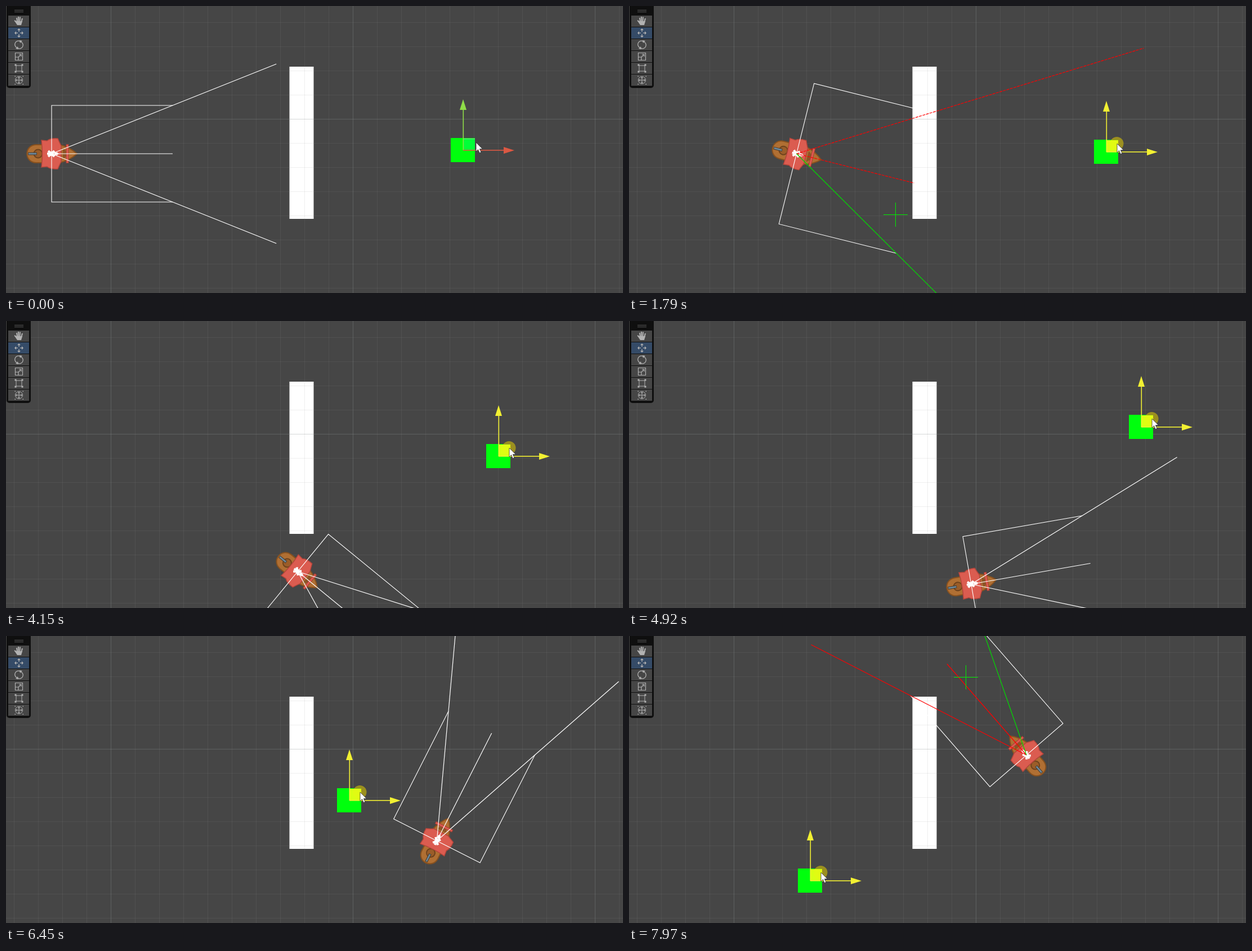
Write an HTML page with a canvas that moves like this. It is 1096 by 511 pixels and loops after 8 s.

```html
<!DOCTYPE html>
<html lang="en">
<head>
<meta charset="utf-8">
<title>Boat steering around a wall</title>
<style>
  html, body { margin: 0; width: 100%; height: 100%; overflow: hidden; background: #464646; }
  canvas { display: block; }
</style>
</head>
<body>
<canvas id="stage" width="1096" height="511"></canvas>
<script>
const ctx = document.getElementById('stage').getContext('2d');
const W = 1096, H = 511, LOOP = 8000, STEP = 69.5, UNIT = 43, SPEED = 0.123;
const RAD = Math.PI / 180;

// time, x, y, heading in degrees
const BOAT = [
  [270, 111, 263, 0], [1680, 284, 263, 0], [1784, 297.5, 263, 14], [2700, 397, 315, 36],
  [3105, 435, 348, 45.5], [3500, 466, 385, 50], [4000, 504, 433, 50], [4147, 518, 446, 39.4],
  [5270, 649, 453, -33], [5676, 694.5, 425.5, -33], [6060, 732, 398, -38],
  [6880, 782, 316, -92], [7205, 772, 274, -119.5], [7690, 730, 238, -142], [7970, 706, 212, -131]
];
// time, x, y
const TARGET = [
  [1090, 812, 256.5], [1784, 848, 260.5], [3105, 873.5, 242.5], [4147, 875, 241.5],
  [4360, 881, 214], [5190, 925, 176], [5676, 935.5, 185.5], [6080, 935.5, 185.5],
  [6430, 620, 290], [6800, 296, 393], [6950, 293, 395], [7205, 299.5, 402.5], [7690, 322, 435.5]
];
// time, distance, angle from the heading
const WAYPOINT = [[1784, 206, 17.6], [3105, 190, 5.5], [3960, 188, 4], [7640, 176, 3]];

function segment(keys, t) {
  let i = 0;
  while (i < keys.length - 2 && t >= keys[i + 1][0]) i++;
  const [a, b] = [keys[i], keys[i + 1]];
  const u = Math.min(1, Math.max(0, (t - a[0]) / (b[0] - a[0])));
  return { a, b, u };
}
function lerpKeys(keys, t) {
  const { a, b, u } = segment(keys, t);
  return a.map((v, i) => v + (b[i] - v) * u).slice(1);
}
function boatAt(t) {
  if (t < 270) return { x: 81, y: 263, h: 0 };
  const { a, b, u } = segment(BOAT, t);
  const reach = SPEED * (b[0] - a[0]);
  const curve = (p, q, m, n) => {
    const u2 = u * u, u3 = u2 * u;
    return (2 * u3 - 3 * u2 + 1) * p + (3 * u2 - 2 * u3) * q
      + (u3 - 2 * u2 + u) * m * reach + (u3 - u2) * n * reach;
  };
  return {
    x: curve(a[1], b[1], Math.cos(a[3] * RAD), Math.cos(b[3] * RAD)),
    y: curve(a[2], b[2], Math.sin(a[3] * RAD), Math.sin(b[3] * RAD)),
    h: a[3] + (b[3] - a[3]) * u
  };
}

function line(color, width, ...pts) {
  ctx.beginPath();
  for (let i = 0; i < pts.length; i += 2) ctx.lineTo(pts[i], pts[i + 1]);
  ctx.strokeStyle = color;
  ctx.lineWidth = width;
  ctx.stroke();
}
function shape(fill, stroke, width, path) {
  const p = typeof path === 'string' ? new Path2D(path) : path;
  if (fill) { ctx.fillStyle = fill; ctx.fill(p); }
  if (stroke) { ctx.strokeStyle = stroke; ctx.lineWidth = width; ctx.stroke(p); }
}
function disc(x, y, r) {
  const p = new Path2D();
  p.arc(x, y, r, 0, 7);
  return p;
}
function rect(color, x, y, w, h) {
  ctx.fillStyle = color;
  ctx.fillRect(x, y, w, h);
}

function drawGrid() {
  const minor = 'rgba(140,140,140,.14)', major = 'rgba(140,145,145,.36)';
  for (let k = -4; k <= 21; k++) rect(k % 10 ? minor : major, 186 + k * UNIT, 0, 1, H);
  for (let k = -4; k <= 7; k++) rect(k ? minor : major, 0, 201 + k * UNIT, W, 1);
}

function drawBoat({ x, y, h }) {
  ctx.save();
  ctx.translate(x, y);
  ctx.rotate(h * RAD);
  shape('#b06f33', '#87511f', 2, 'M-28-16C-49-15-49 15-28 16L14 16Q32 12 45 0Q32-12 14-16Z');
  shape('#9b5d29', '#6f431d', 2, disc(-24, 0, 7.5));
  line('#4f4438', 5, -42, 0, -26, 0);
  line('#6c8ba0', 2.5, -41, 0, -27, 0);
  shape('#8c5426', null, 0, 'M20-10L32 0L20 10Z');
  shape('#db5c50', '#b3453b', 1.5,
    'M-18-24L-8-23Q-2-28 11-27Q14-20 17-14L17 14Q14 20 11 27Q-2 28-8 23L-18 24Q-15 0-18-24Z');
  line('#a43f35', 5, 28, -17, 28, 17);
  line('#dd5b50', 3, 28, -16, 28, 16);
  line('#fff', 4, -6, -5, 5, 5);
  line('#fff', 4, -6, 5, 5, -5);
  shape('#fff', null, 0, disc(0, 0, 4));
  shape('#fff', null, 0, 'M-8-2h4v4h-4zM5-2.5h5l3 2.5-3 2.5h-5z');
  ctx.restore();
}

function drawSensors(boat, t) {
  const first = t >= 1680 && t < 3960;
  const avoiding = first || t >= 7640;
  const wide = t >= 1680 && t < 2830;
  const side = (wide ? 3 : 2) * UNIT, front = 5 * UNIT, reach = (wide ? 15 : 10) * UNIT;
  const spread = Math.atan2(side, front);
  const c = Math.cos(boat.h * RAD), s = Math.sin(boat.h * RAD);
  const at = (f, r) => [boat.x + f * c - r * s, boat.y + f * s + r * c];
  const ray = (angle, len) => [boat.x, boat.y, ...at(len * Math.cos(angle), len * Math.sin(angle))];
  const hit = avoiding ? '#f00' : '#fff', free = avoiding ? '#0d0' : '#fff';

  line('#fff', 1.1, ...at(front, -side), ...at(0, -side), ...at(0, side), ...at(front, side));
  if (wide) ctx.setLineDash([5, 1.5]);
  line(hit, 1.2, ...ray(0, front));
  line(hit, 1.2, ...ray(-spread, reach));
  ctx.setLineDash([]);
  line(free, 1.2, ...ray(spread, reach));

  if (avoiding) {
    const [len, angle] = lerpKeys(WAYPOINT, t);
    const [, , wx, wy] = ray(angle * RAD, len).map(Math.round);
    rect('#0e0', wx - 21, wy, 43, 1);
    rect('#0e0', wx, wy - 21, 1, 43);
  }
}

function drawTarget(t) {
  const [x, y] = lerpKeys(TARGET, t).map(Math.round);
  const drag = t >= 1090;
  const up = drag ? '#f2f032' : '#8fdc48', right = drag ? '#f2f032' : '#db5843';
  const [cx, cy] = t < 700 ? [x + 23, y - 14] : [x + 19, y - 15];

  rect('#00ff0d', x - 22, y - 22, 43, 43);
  if (drag) shape('rgba(174,160,24,.82)', null, 0, disc(cx - 0.5, cy, 12));
  rect(drag ? 'rgba(230,255,20,.95)' : '#00ff38', x, y - 21, 21, 21);
  if (!drag) {
    rect('#8fc0a0', x, y - 21, 21, 1);
    rect('#e09a30', x, y - 1, 21, 1);
  }
  rect(up, x - 0.5, y - 74, 1.6, 74);
  rect(right, x, y - 1, 74, 1.6);
  shape(up, null, 0, `M${x} ${y - 91}l6 19h-12z`);
  shape(right, null, 0, `M${x + 91} ${y}l-19-6v12z`);
  shape('#fff', '#333', 0.8, `M${cx} ${cy}v16l3.6-3.4 2.6 6 2.8-1.2-2.6-5.8h5z`);
}

function drawToolbar() {
  ctx.beginPath();
  ctx.roundRect(1, -6, 43, 152, 5);
  ctx.fillStyle = '#0f0f0f';
  ctx.fill();
  rect('#5c5c5c', 15, 7, 16, 1);
  rect('#5c5c5c', 15, 10, 16, 1);
  const icon = '#b2b2b2';
  const arrows = 'M0-8l3 3h-6zM0 8l3-3h-6zM-8 0l3-3v6zM8 0l-3-3v6z';
  const icons = [
    () => {
      shape(icon, null, 0, 'M-4 0L-8-2Q-9 0-7 1L-3 7H4L6 0Z');
      [[-4, -6], [-1, -8], [2, -7.5], [6, -5]].forEach(([x, y]) => line(icon, 2, x, y, x * 0.7, 2));
    },
    () => {
      shape(icon, null, 0, arrows);
      line(icon, 1.2, -6, 0, -2, 0); line(icon, 1.2, 2, 0, 6, 0);
      line(icon, 1.2, 0, -6, 0, -2); line(icon, 1.2, 0, 2, 0, 6);
    },
    () => {
      shape(null, icon, 1.3, 'M-4 5A6 6 0 0 1 2-6M4-5A6 6 0 0 1-2 6');
      shape(icon, null, 0, 'M1-8l5 1-4 4zM-1 8l-5-1 4-4z');
    },
    () => {
      shape(null, icon, 1.2, 'M-6.5-6.5h13v13h-13zM-6 1h5v5M-1 1l4-4M0-4h4v4');
    },
    () => {
      shape(null, icon, 1, 'M-5-5h10v10h-10z');
      for (const x of [-6, 6]) for (const y of [-6, 6]) rect(icon, x - 1.5, y - 1.5, 3, 3);
    },
    () => {
      shape(null, icon, 1, disc(0, 0, 6.5));
      ctx.save(); ctx.scale(0.75, 0.75);
      shape(icon, null, 0, arrows);
      ctx.restore();
      line(icon, 1, -5, 0, 5, 0); line(icon, 1, 0, -5, 0, 5);
      for (const x of [-7, 7]) for (const y of [-7, 7]) rect(icon, x - 0.5, y - 0.5, 1.5, 1.5);
    }
  ];
  icons.forEach((draw, i) => {
    rect(i === 1 ? '#354b67' : '#464646', 4, 17 + i * 21, 37, 20);
    ctx.save();
    ctx.translate(23, 27 + i * 21);
    draw();
    ctx.restore();
  });
}

function render(now) {
  const clock = now % LOOP;
  const t = clock < 270 ? 0 : Math.max(270, 1020 + Math.floor((clock - 1020) / STEP) * STEP);
  const boat = boatAt(t);
  rect('#464646', 0, 0, W, H);
  rect('#fff', 503.5, 108, 43, 271);
  drawGrid();
  drawBoat(boat);
  drawSensors(boat, t);
  drawTarget(t);
  drawToolbar();
}

const start = performance.now();
function tick() {
  render(performance.now() - start);
  requestAnimationFrame(tick);
}
tick();
</script>
</body>
</html>
```
